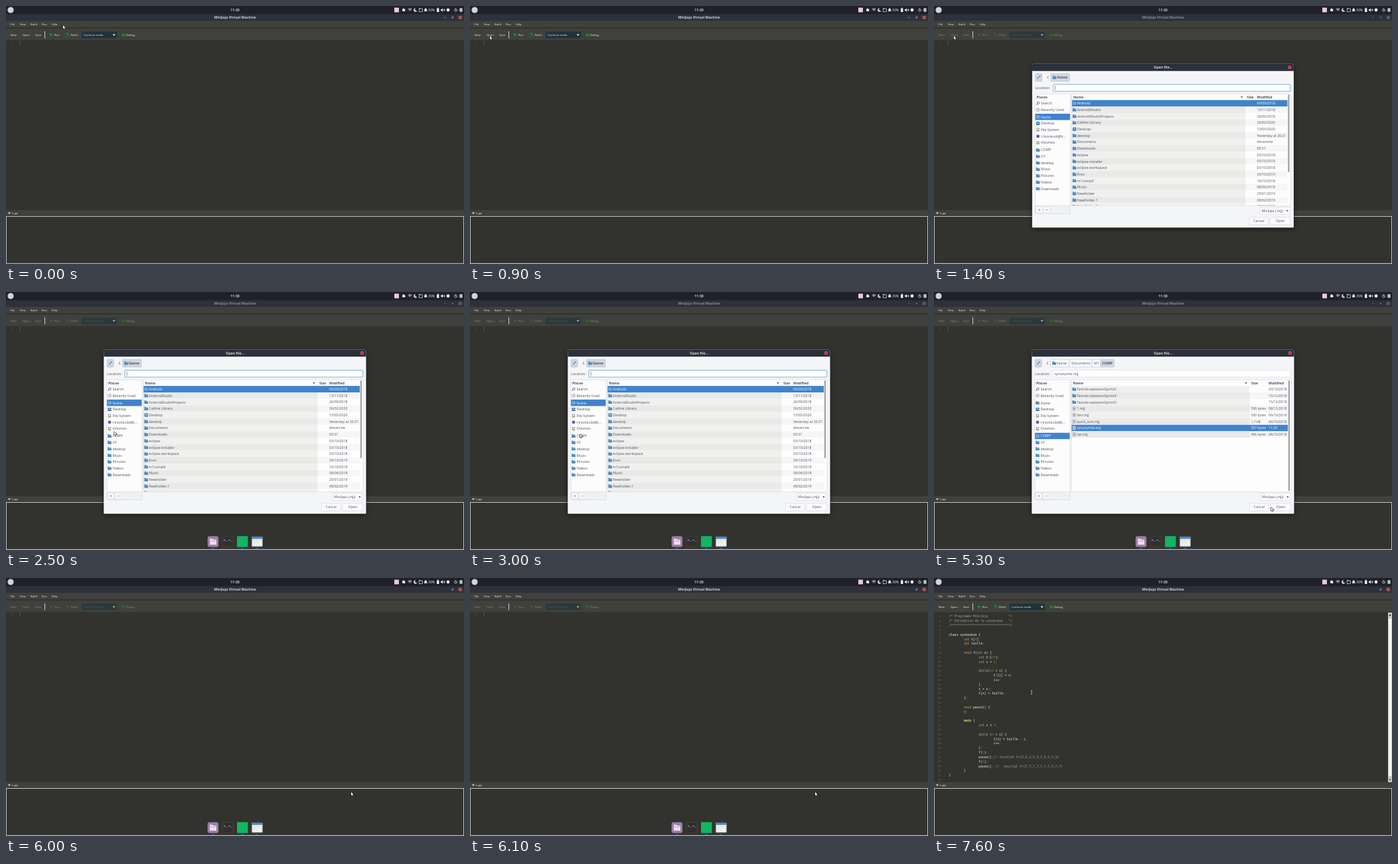
Recreate the animation shown at these times as an HTML page with a canvas. Size 690 px wide and 388 px high, loop 8000 ms.

```html
<!DOCTYPE html>
<html lang="en">
<head>
<meta charset="utf-8">
<title>Open a program</title>
<style>
html, body { margin: 0; width: 100%; height: 100%; overflow: hidden; background: #32332e; }
canvas { display: block; width: 690px; height: 388px; }
</style>
</head>
<body>
<canvas></canvas>
<script>
const W = 690, H = 388, LOOP = 8000;
const canvas = document.querySelector('canvas');
const ctx = canvas.getContext('2d');
const ratio = window.devicePixelRatio || 1;
canvas.width = W * ratio;
canvas.height = H * ratio;

const SANS = '"Open Sans", "Noto Sans", sans-serif';
const MONO = '"DejaVu Sans Mono", monospace';
const BLUE = '#3f83d0', INK = '#4c5361';
const USER = 'lisone';

// Times at which the state of the interface changes.
const DIALOG_OPEN = 1300, FOLDER_OPEN = 3100, FILE_PICKED = 4600, DIALOG_CLOSE = 5900, CODE_SHOWN = 6400;

const POINTER = [
  [0, 86, 29], [100, 84, 31], [900, 30, 45], [1500, 30, 45], [2500, 163, 210], [3100, 166, 214],
  [3600, 192, 213], [3900, 205, 212], [4500, 228, 203], [4800, 228, 203], [5300, 508, 324],
  [5700, 520, 322], [6300, 520, 322], [6700, 490, 308], [7500, 147, 172], [8000, 147, 172]
];

const HOME = [
  ['Android', '09/09/2018'], ['AndroidStudio', '13/11/2018'], ['AndroidStudioProjects', '26/09/2018'],
  ['Calibre Library', '26/02/2020'], ['Desktop', '13/05/2020'], ['develop', 'Yesterday at 20:21'],
  ['Documents', 'dimanche'], ['Downloads', '09:31'], ['eclipse', '03/10/2018'],
  ['eclipse-installer', '03/10/2018'], ['eclipse-workspace', '03/10/2018'], ['Envs', '29/10/2019'],
  ['m1comp6', '16/10/2018'], ['Music', '08/06/2018'], ['NewFolder', '25/01/2019'],
  ['NewFolder.1', '08/02/2019'], ['NewFolder.2', '08/02/2019']
];
const COMP = [
  ['TestsAcceptationSprint2', '24/10/2018'], ['TestsAcceptationSprint4', '15/12/2018'],
  ['TestsAcceptationSprint5', '15/12/2018'], ['1.mjj', '08/12/2018', '596 bytes'],
  ['fact.mjj', '06/10/2018', '500 bytes'], ['quick_sort.mjj', '06/10/2018', '1,7 kB'],
  ['synonymie.mjj', '11:29', '507 bytes'], ['tas.mjj', '06/10/2018', '466 bytes']
];
const PLACES = ['Search', 'Recently Used', USER, 'Desktop', 'File System', 't.' + USER + '.ob@k...', 'Volumes',
  'COMP', 'CV', 'develop', 'Music', 'Pictures', 'Videos', 'Downloads'];

const CODE = `/* Programme MiniJaja           */
/* Validation de la synonimie   */
/********************************/

class synonymie {
        int t[4];
        int taille;

        void f(int x) {
                int t1[10];
                int i = 0;

                while(10 > i) {
                        t1[i] = x;
                        i++;
                };
                t = t1;
                t[x] = taille;
        };

        void pause() {
        };

        main {
                int i = 0;

                while (4 > i) {
                        t[i] = taille - i;
                        i++;
                };
                f(3);
                pause();// resultat t=[3,3,3,4,3,3,3,3,3,3]
                f(7);
                pause(); //  resultat t=[7,7,7,7,7,7,7,4,7,7]
        }
}
`.split('\n');
const TOKEN = /\/[*\/].*|\b(?:class|int|void|while|main)\b|\b\d+\b|;|[^\s;]/g;

const clamp = v => Math.max(0, Math.min(1, v));
const ramp = (t, from, to) => { const v = clamp((t - from) / (to - from)); return v * v * (3 - 2 * v); };

function rect(x, y, w, h, fill, radius = 0, stroke) {
  ctx.beginPath();
  ctx.roundRect(x, y, w, h, radius);
  if (fill) { ctx.fillStyle = fill; ctx.fill(); }
  if (stroke) { ctx.strokeStyle = stroke; ctx.lineWidth = 0.7; ctx.stroke(); }
}
function disc(x, y, r, fill) {
  ctx.beginPath();
  ctx.arc(x, y, r, 0, 7);
  ctx.fillStyle = fill;
  ctx.fill();
}
function shape(points, fill) {
  ctx.beginPath();
  points.forEach(([x, y]) => ctx.lineTo(x, y));
  ctx.closePath();
  ctx.fillStyle = fill;
  ctx.fill();
}
function line(points, color, width = 0.8) {
  ctx.beginPath();
  points.forEach(([x, y]) => ctx.lineTo(x, y));
  ctx.strokeStyle = color;
  ctx.lineWidth = width;
  ctx.stroke();
}
function arcs(x, y, radii, from, to, color) {
  ctx.strokeStyle = color;
  ctx.lineWidth = 0.8;
  for (const r of radii) {
    ctx.beginPath();
    ctx.arc(x, y, r, from, to);
    ctx.stroke();
  }
}
// Tiny type is set ten times larger and scaled down, which keeps its spacing even.
function text(s, x, y, size, fill, { align = 'left', weight = 400, family = SANS } = {}) {
  ctx.save();
  ctx.translate(x, y + size * 0.36);
  ctx.scale(0.1, 0.1);
  ctx.font = `${weight} ${size * 10}px ${family}`;
  ctx.textAlign = align;
  ctx.fillStyle = fill;
  ctx.fillText(s, 0, 0);
  ctx.restore();
}
const down = (x, y, fill, r = 2) => shape([[x - r, y - r / 2], [x + r, y - r / 2], [x, y + r * 0.7]], fill);

function folder(x, y, fill = '#4a86c4') {
  shape([[x - 2.8, y - 2.5], [x - 0.6, y - 2.5], [x + 0.2, y - 1.7], [x + 2.8, y - 1.7], [x + 2.8, y + 2.4], [x - 2.8, y + 2.4]], fill);
  rect(x - 2.2, y - 1, 5, 0.5, '#8db5df');
}

function drawPanel() {
  rect(0, 0, W, 12.5, '#20202a');
  disc(7, 6, 4.6, '#d4d4d8');
  text('11:30', 345, 6, 5.3, '#f4f4f4', { align: 'center', weight: 600 });
  const c = '#ececf0';
  rect(585, 2.5, 7, 7, '#e3cdd3');
  rect(597, 5, 4.5, 3, c, 1);
  disc(599, 5.5, 2, c);
  arcs(608.5, 8, [1.2, 2.8, 4.2], -2.4, -0.75, c);
  disc(617, 6, 2.7, c);
  disc(618.4, 5.1, 2.3, '#20202a');
  rect(622.4, 4, 5, 4.6, null, 0.5, c);
  line([[622.4, 3.6], [624.4, 3.6]], c);
  shape([[630, 8], [630.7, 4.5], [632.2, 3], [633.7, 4.5], [634.4, 8]], c);
  text('39%', 636, 6, 5.1, c);
  rect(649, 3.5, 3.4, 5.4, c, 0.5);
  rect(650, 2.6, 1.4, 1, c);
  shape([[655, 5], [656.3, 5], [658, 3.2], [658, 8.8], [656.3, 7], [655, 7]], c);
  arcs(658, 6, [1.4, 2.8], -0.8, 0.8, c);
  disc(666, 6, 2.4, c);
  arcs(677.5, 6.2, [2], -0.9, 4.1, c);
  line([[677.5, 3.2], [677.5, 6]], c);
  rect(683.5, 3.5, 4, 5, c, 0.5);
  disc(685.5, 6, 0.8, '#20202a');
}

function drawWindow(t, active, enabled) {
  rect(0, 12.5, W, 10, '#2d313b');
  text('MiniJaja Virtual Machine', 345, 17.2, 5.15, active ? '#ced2da' : '#8a8e98', { align: 'center', weight: 700 });
  const control = active ? '#a9aeb8' : '#656a76';
  if (t < DIALOG_CLOSE) line([[660, 17.3], [662.6, 17.3]], control);
  rect(671.9, 16.3, 2, 1.8, null, 0, control);
  disc(684.3, 17.2, 2.7, active ? '#cc575d' : '#555a66');
  if (active) disc(684.3, 17.2, 0.9, '#2d313b');

  rect(0, 22.5, W, 29.5, '#40413c');
  rect(0, 32.6, W, 0.8, '#272824');
  rect(0, 51.4, W, 0.7, '#2a2b27');
  [['File', 6.5], ['View', 20.7], ['Build', 37], ['Run', 54], ['Help', 68.5]]
    .forEach(([s, x]) => text(s, x, 27.7, 4.2, '#f2f2ee'));

  rect(58, 38, 0.9, 10.5, '#deded8');
  ctx.globalAlpha = enabled ? 1 : 0.42;
  [['New', 7], ['Open', 25], ['Save', 44], ['Run', 73], ['Build', 98], ['Debug', 181]]
    .forEach(([s, x]) => text(s, x, 43.5, 4.2, '#f2f2ee'));
  const green = '#159029';
  shape([[66.3, 40.7], [71, 43.4], [66.3, 46.1]], green);
  line([[92, 41.5], [96.5, 46]], green, 1.3);
  line([[90.7, 42.8], [93.2, 40.4]], green, 1.8);
  disc(177, 43.6, 1.9, green);
  for (const dy of [-1.6, 0, 1.6]) line([[174.3, 43.6 + dy], [179.7, 43.6 + dy]], green, 0.5);
  ctx.globalAlpha = enabled ? 1 : 0.6;
  rect(114, 38.6, 53, 9.6, '#20333a', 1);
  text('Continue mode', 117, 43.5, 4.1, enabled ? '#f0f2f0' : '#4c7469');
  ctx.globalAlpha = 1;
  down(162.7, 43.6, enabled ? '#fff' : '#c2c6c4', 2);

  rect(0, 52, W, 255, '#32332e');
  rect(0, 307, W, 9, '#40413c');
  down(5, 311.5, '#f2f2ee', 2);
  text('Logs', 9, 311.5, 4.2, '#f2f2ee');
  rect(0.5, 316.5, 689, 70.7, '#32332e', 0, '#dededa');
}

function tokenStyle(token) {
  if (token[0] === '/') return ['#a2a399', 400];
  if (token === 'main') return ['#e9d687', 700];
  if (token === 'class') return ['#d8b98c', 600];
  if (/^(int|void|while)$/.test(token)) return ['#d3a878', 400];
  if (/^\d/.test(token)) return ['#777c55', 400];
  if (token === ';') return ['#a87345', 400];
  return ['#f1f1ea', 400];
}

function drawEditor(shown) {
  if (!shown) {
    text('1', 10.5, 55.3, 4, '#5c5d56', { align: 'right', family: MONO });
    rect(21.2, 52.5, 0.6, 6, '#6c6d66');
    return;
  }
  CODE.forEach((row, i) => {
    const y = 57.8 + i * 6.82;
    text(String(i + 2), 10.5, y, 4, '#62635b', { align: 'right', family: MONO });
    for (const m of row.matchAll(TOKEN)) {
      const [color, weight] = tokenStyle(m[0]);
      text(m[0], 22.4 + m.index * 2.81, y, 4.67, color, { weight, family: MONO });
    }
  });
  rect(684, 52, 6, 255, '#c9c9c6');
  rect(684.8, 61, 4.4, 237, '#f3f3f1', 1);
  shape([[685.2, 57], [688.8, 57], [687, 54]], '#44453f');
  down(687, 303.5, '#44453f', 1.8);
}

function placeIcon(i, x, y, selected) {
  if (i === 0) {
    arcs(x + 0.5, y - 0.6, [1.7], 0, 7, INK);
    line([[x - 0.7, y + 0.7], [x - 2.4, y + 2.4]], INK, 1);
  } else if (i === 1) {
    rect(x - 2.5, y - 2.5, 5, 5, '#e9ebef', 2.5, '#9299a6');
    line([[x, y - 1.6], [x, y], [x + 1.4, y]], '#777e8c', 0.6);
  } else if (i === 3) {
    rect(x - 2.6, y - 2.5, 5.2, 5, '#336fae', 0.6);
    rect(x - 1.6, y - 1, 3.2, 1.3, '#dce8f5');
  } else if (i === 4 || i === 6) {
    rect(x - 2.2, y - 2.6, 4.4, 5.2, '#a7a39b', 0.6);
    disc(x, y - 0.6, 1.3, '#e6e3dd');
  } else if (i === 5) {
    disc(x, y, 2.4, '#5c50b0');
  } else folder(x, y, selected ? '#6aa5e2' : undefined);
}

function drawPlaces(current) {
  rect(152, 132, 53, 180.5, '#fcfcfc', 0, '#d8dce4');
  text('Places', 154, 137, 5.2, INK, { weight: 700 });
  PLACES.forEach((name, i) => {
    const y = 146.2 + i * 9.73 + (i > 1 ? 1 : 0) + (i > 6 ? 1.5 : 0) - (i > 1 && i < 7 ? 0 : i > 6 ? 0.3 : 0);
    const selected = i === current;
    if (selected) rect(152, y - 4.8, 52.5, 9.6, BLUE);
    placeIcon(i, 156, y, selected);
    text(name, 160.5, y, 5.3, selected ? '#fff' : INK);
  });
  rect(152, 300.5, 53, 12, '#eff0f2', 0, '#d8dce4');
  for (const x of [153.2, 164.2]) {
    rect(x, 302, 10, 9.6, '#f8f8f9', 1, '#d8dce4');
    line([[x + 3.3, 306.8], [x + 6.7, 306.8]], '#969ca8');
  }
  line([[158.2, 305.1], [158.2, 308.5]], '#969ca8');
}

function drawFiles(inside, current) {
  const files = inside ? COMP : HOME;
  const shift = inside ? 6 : 0, dateX = inside ? 504 : 487;
  ctx.save();
  ctx.beginPath();
  ctx.rect(207, 132, 331, 168.5);
  ctx.clip();
  rect(207, 132, 331, 169, '#fdfdfd');
  text('Name', 209.5, 137, 5.2, INK, { weight: 700 });
  text('Size', 472 + shift, 137, 5.2, INK, { weight: 700 });
  text('Modified', dateX, 137, 5.2, INK, { weight: 700 });
  down(464 + shift, 137, INK, 1.8);
  files.forEach(([name, date, size], i) => {
    const y = 146.2 + i * 9.72, selected = i === current, color = selected ? '#fff' : INK;
    rect(207, y - 4.86, 326, 9.72, i % 2 ? '#f6f6f6' : '#fdfdfd');
    rect(207, y - 4.86, 262.5 + shift, 9.72, i % 2 ? '#e9e9e8' : '#f0f0ef');
    if (selected) rect(207, y - 4.86, 326, 9.72, BLUE);
    if (size) {
      rect(209, y - 2.7, 4.2, 5.4, '#dcdee2', 0.4, '#a3a8b2');
      rect(210.2, y - 1, 1.8, 2, '#7d8490');
    } else if (name === 'Desktop') placeIcon(3, 211.2, y);
    else folder(211.2, y, selected ? '#6aa5e2' : undefined);
    text(name, 215.3, y, 5.3, color);
    if (size) text(size, 477.5, y, 5.1, color);
    text(date, dateX, y, 5.15, color);
  });
  rect(533.8, 133, 2.2, inside ? 166 : 117, '#9a9ea6', 1);
  ctx.restore();
  rect(207, 132, 331, 168.5, null, 0, '#d8dce4');
}

function crumb(x, w, label, active, labelX) {
  rect(x, 101.3, w, 11.6, active ? '#d0d6e1' : '#f9f9fa', 1, '#c4cbd8');
  text(label, labelX, 107.1, 5.3, INK, { weight: active ? 700 : 400 });
}

function button(x, y, w, label) {
  rect(x, y, w, 11, '#fbfbfc', 1.2, '#d3d8e2');
  text(label, x + w / 2, y + 5.5, 5.3, INK, { align: 'center' });
}

function drawDialog(t) {
  const inside = t >= FOLDER_OPEN, picked = t >= FILE_PICKED;
  const scale = 0.985 + 0.015 * clamp((t - DIALOG_OPEN + 100) / 250);
  ctx.save();
  ctx.globalAlpha = clamp((t - DIALOG_OPEN + 50) / 100);
  ctx.translate(345, 210);
  ctx.scale(scale, scale);
  ctx.translate(-345, -210);
  ctx.shadowColor = 'rgba(0,0,0,.55)';
  ctx.shadowBlur = 7;
  ctx.shadowOffsetY = 2;
  rect(147.3, 86.5, 395.2, 247, '#f4f5f6', [3, 3, 1, 1]);
  ctx.shadowColor = 'transparent';
  rect(147.3, 86.5, 395.2, 10.8, '#2b303b', [3, 3, 0, 0]);
  text('Open file...', 345, 91.8, 5.2, '#d5d8df', { align: 'center', weight: 700 });
  disc(536.4, 91.8, 2.7, '#cc475d');
  disc(536.4, 91.8, 0.8, '#2b303b');

  rect(152.3, 101.3, 9.8, 11.6, '#d0d6e1', 1, '#bcc3d0');
  line([[155, 109.2], [159, 105]], INK, 1);
  line([[158, 104.8], [159.7, 104.8], [159.7, 106.5]], '#b2763d', 0.8);
  line([[172, 105], [170.2, 107], [172, 109]], INK);
  crumb(175.5, 28.5, USER, !inside, 185);
  folder(181, 107.1);
  if (inside) {
    crumb(204, 34, 'Documents', false, 207.3);
    crumb(238, 13, 'M1', false, 241);
    crumb(251, 20.5, 'COMP', true, 253.2);
  }
  text('Location:', 152, 122.8, 5.3, INK);
  rect(179, 117.6, 358.7, 10.4, '#fff', 1, picked ? '#d5dae4' : '#4b8edb');
  if (picked) text('synonymie.mjj', 181.5, 122.8, 5.3, INK);
  else rect(181.8, 119.6, 0.6, 6.4, '#555');

  drawPlaces(inside ? 7 : 2);
  drawFiles(inside, picked ? 6 : 0);
  rect(491, 302.6, 46.7, 11, '#fbfbfc', 1.2, '#d3d8e2');
  text('MiniJaja (.mjj)', 494, 308.2, 5.2, INK);
  down(532.8, 308.2, INK, 1.8);
  button(475.5, 318, 28.5, 'Cancel');
  button(507, 318, 30.7, 'Open');
  ctx.restore();
}

function drawDock(t) {
  const shown = ramp(t, 1550, 1950) * (1 - ramp(t, 6700, 7100));
  if (!shown) return;
  ctx.save();
  ctx.translate(0, (1 - shown) * 24);
  rect(303.7, 367.2, 16.4, 16.4, '#9d7fa6', 3);
  shape([[307, 371], [311, 371], [312.3, 372.5], [317, 372.5], [317, 380], [307, 380]], '#ecdcf0');
  rect(307, 374, 10, 0.7, '#b99fc1');
  rect(326, 367.2, 16.2, 16.2, '#30312f', 2.5, '#484946');
  text('>_ >_', 328, 372, 4.2, '#f0f0f0', { family: MONO, weight: 700 });
  rect(348, 367.2, 16.4, 16.4, '#12b661');
  rect(370.4, 368.3, 16, 14.5, '#f1f1ea', 0.8, '#8d9296');
  rect(370.4, 368.3, 16, 3, '#4384cf');
  rect(372, 373.5, 12.8, 0.7, '#c9cec3');
  rect(372, 376.5, 9, 0.7, '#d7d5bd');
  for (const x of [312, 356, 378]) rect(x - 2, 385.3, 4, 1, '#3c7fca', 0.5);
  ctx.restore();
}

function drawPointer(t) {
  const next = Math.max(1, POINTER.findIndex(p => p[0] > t));
  const [t0, x0, y0] = POINTER[next - 1], [t1, x1, y1] = POINTER[next];
  const k = ramp(t, t0, t1), x = x0 + (x1 - x0) * k, y = y0 + (y1 - y0) * k;
  if (t > 6700 && y < 306) {
    line([[x - 1, y - 2.6], [x + 1, y - 2.6]], '#e6e6e0', 0.6);
    line([[x - 1, y + 2.6], [x + 1, y + 2.6]], '#e6e6e0', 0.6);
    line([[x, y - 2.6], [x, y + 2.6]], '#e6e6e0', 0.6);
    return;
  }
  const arrow = [[0, 0], [0, 4.9], [1.1, 4], [1.9, 5.7], [2.8, 5.3], [2, 3.6], [3.5, 3.5]].map(([a, b]) => [x + a, y + b]);
  line([...arrow, arrow[0]], '#161616', 1.1);
  shape(arrow, '#fff');
}

function draw(t) {
  const dialog = t >= DIALOG_OPEN && t < DIALOG_CLOSE;
  const loaded = t >= CODE_SHOWN;
  ctx.setTransform(ratio, 0, 0, ratio, 0, 0);
  drawPanel();
  drawWindow(t, !dialog, t < DIALOG_OPEN || loaded);
  drawEditor(loaded);
  if (dialog) drawDialog(t);
  drawDock(t);
  drawPointer(t);
}

function tick() {
  draw(Math.floor(performance.now() % LOOP / 100) * 100);
  requestAnimationFrame(tick);
}
tick();
</script>
</body>
</html>
```
